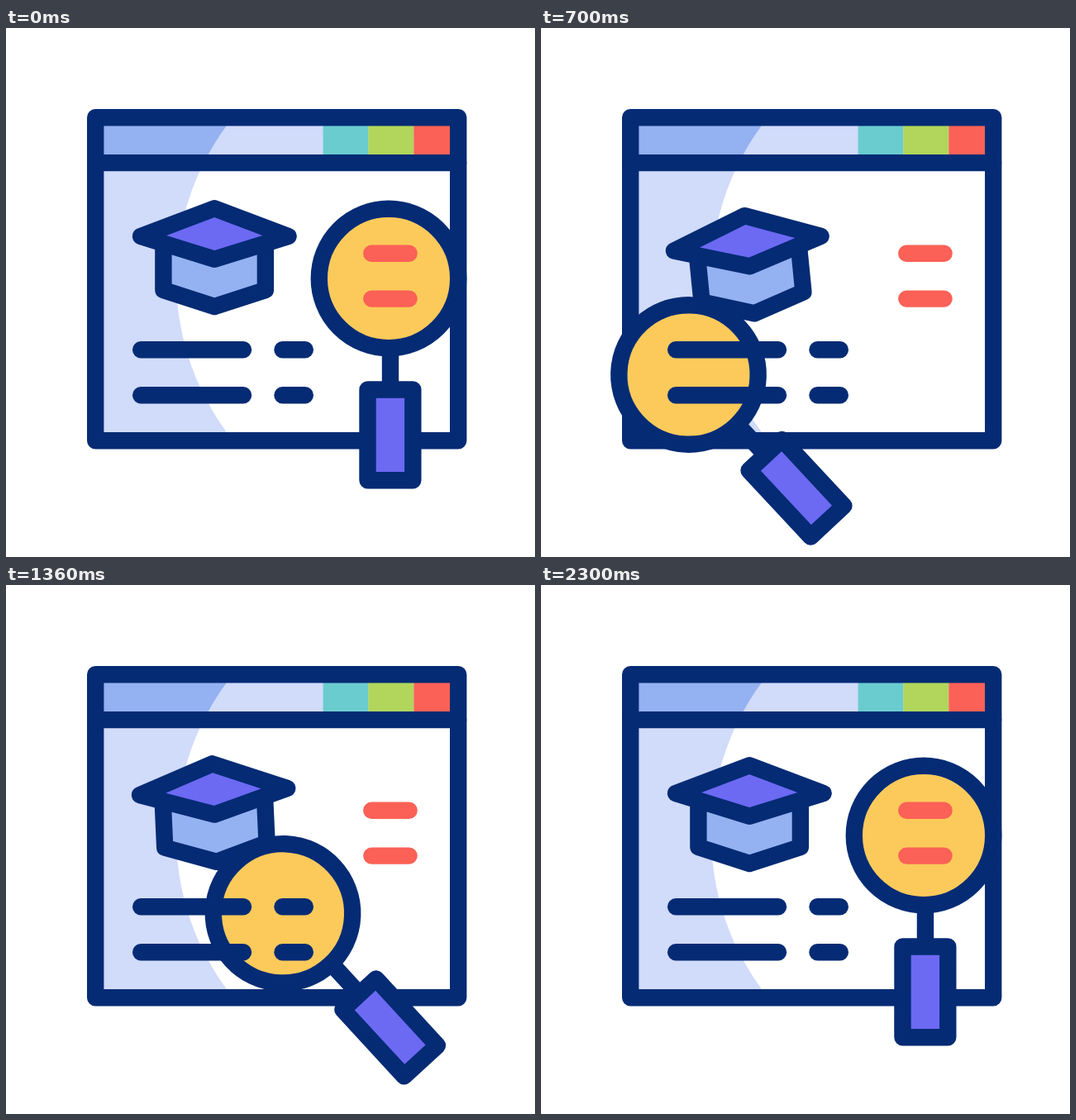
These frames come from a looping animation (640 px wide and 640 px high, 2.4 s). An HTML page with a canvas:

```html
<!DOCTYPE html>
<html lang="en">
<head>
<meta charset="utf-8">
<title>Course search</title>
<style>
  html, body { margin: 0; width: 100%; height: 100%; overflow: hidden; background: #fff; }
  canvas { display: block; width: 640px; height: 640px; }
</style>
</head>
<body>
<canvas id="stage" width="640" height="640"></canvas>
<script>
const ctx = document.getElementById('stage').getContext('2d');
const LOOP = 2400;
const NAVY = '#042b74', PALE = '#d1dbfa', BLUE = '#94b1f1', PURPLE = '#6c69f3';
const TEAL = '#6bccCf', GREEN = '#b1d65b', RED = '#fb6156', YELLOW = '#fcca5b';

// Keys are [time, value]; each stretch eases in and out.
const lensAngle = [[285, 0], [705, 43], [1333, 43], [1867, -4.3], [2310, 0]];
const capAngle = [[400, 0], [720, -5.7], [1067, 5], [1480, -4.5], [2070, 0]];
const capShift = [[400, 0], [720, 8.7], [1067, -28], [1480, 4.5], [2070, 0]];
const lensOut = makePath('M463 303C418 395 320 424 178.5 419.5');
const lensBack = makePath('M178.5 419.5C320 426 420 368 463 303');

function makePath(d) {
  const el = document.createElementNS('http://www.w3.org/2000/svg', 'path');
  el.setAttribute('d', d);
  const length = el.getTotalLength();
  return u => el.getPointAtLength(u * length);
}

function ease(t, from, to) {
  const x = Math.min(1, Math.max(0, (t - from) / (to - from)));
  return x * x * (3 - 2 * x);
}

function track(keys, t) {
  let value = keys[0][1];
  for (let i = 1; i < keys.length; i++) {
    value += (keys[i][1] - keys[i - 1][1]) * ease(t, keys[i - 1][0], keys[i][0]);
  }
  return value;
}

const rad = deg => deg * Math.PI / 180;

function box(color, x0, y0, x1, y1) {
  ctx.fillStyle = color;
  ctx.fillRect(x0, y0, x1 - x0, y1 - y0);
}

function poly(points, closed, fill, stroke = NAVY) {
  ctx.beginPath();
  points.forEach(([x, y]) => ctx.lineTo(x, y));
  if (closed) ctx.closePath();
  if (fill) {
    ctx.fillStyle = fill;
    ctx.fill();
  }
  ctx.strokeStyle = stroke;
  ctx.stroke();
}

const bar = (x0, x1, y, color) => poly([[x0, y], [x1, y]], false, null, color);
const frame = (x0, y0, x1, y1, fill) =>
  poly([[x0, y0], [x1, y0], [x1, y1], [x0, y1]], true, fill);

function disc(x, y, r) {
  ctx.beginPath();
  ctx.arc(x, y, r, 0, 2 * Math.PI);
}

// Left and right tints split by a large circle.
function split(left, right, y0, y1) {
  box(left, 110, y0, 545, y1);
  ctx.save();
  ctx.beginPath();
  ctx.rect(110, y0, 435, y1 - y0);
  ctx.clip();
  disc(518.6, 303.5, 312.6);
  ctx.fillStyle = right;
  ctx.fill();
  ctx.restore();
}

function drawWindow() {
  split(PALE, '#fff', 163, 499);
  split(BLUE, PALE, 110, 163);
  box(TEAL, 383.6, 110, 438.3, 163);
  box(GREEN, 438.3, 110, 493.4, 163);
  box(RED, 493.4, 110, 545, 163);
  frame(108.2, 108.2, 547.2, 499.2);
  bar(108.2, 547.2, 163.1, NAVY);
}

function drawCap(t) {
  ctx.save();
  ctx.translate(252.3, 278 + track(capShift, t));
  ctx.rotate(rad(track(capAngle, t)));
  ctx.translate(-252.3, -278);
  poly([[190.4, 262], [190.4, 317], [252.2, 337], [313.9, 317], [313.9, 262]], false, BLUE);
  poly([[163, 252], [252.2, 218.3], [341.6, 252], [252.2, 279.7]], true, PURPLE);
  ctx.restore();
}

function drawLines() {
  for (const y of [389.3, 444.2]) {
    bar(163.2, 287, y, NAVY);
    bar(334.5, 361.8, y, NAVY);
  }
  for (const y of [272.8, 327.6]) bar(442.3, 487.6, y, RED);
}

function drawScene(t) {
  const pos = t < 800 ? lensOut(ease(t, 200, 700)) : lensBack(ease(t, 878, 1849));

  box('#fff', 0, 0, 640, 640);
  ctx.lineWidth = 20.4;
  ctx.lineCap = ctx.lineJoin = 'round';
  drawWindow();
  drawCap(t);

  // The text bars sit between the glass and its rim.
  disc(pos.x, pos.y, 84.2);
  ctx.fillStyle = YELLOW;
  ctx.fill();
  drawLines();

  ctx.save();
  ctx.translate(pos.x, pos.y);
  ctx.rotate(-rad(track(lensAngle, t)));
  disc(0, 0, 84.2);
  ctx.strokeStyle = NAVY;
  ctx.stroke();
  poly([[2, 86], [2, 134]], false);
  frame(-25.5, 134.5, 29.3, 244.2, PURPLE);
  ctx.restore();
}

const start = performance.now();
function tick() {
  drawScene((performance.now() - start) % LOOP);
  requestAnimationFrame(tick);
}
tick();
</script>
</body>
</html>
```
